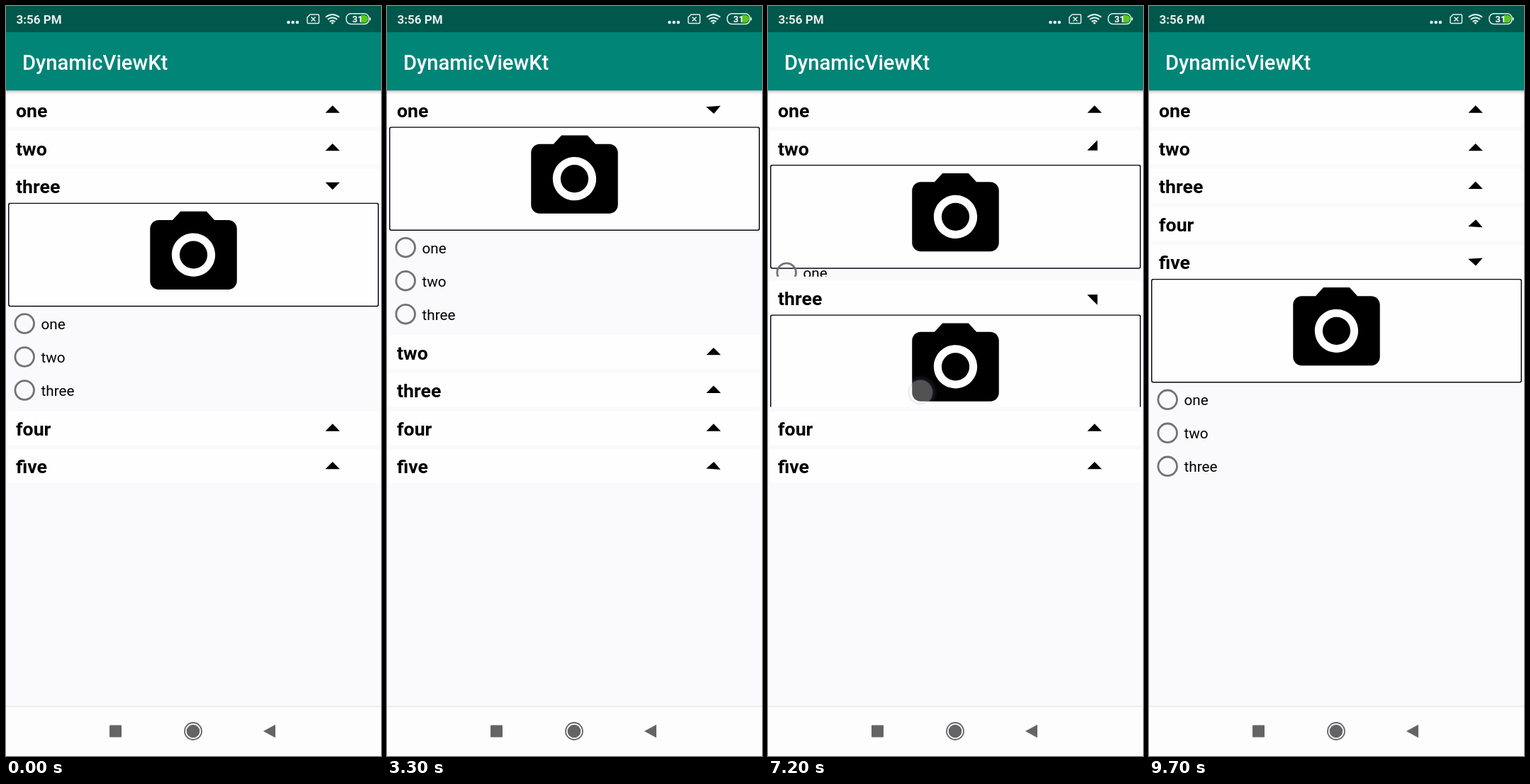
Animation, 529 px wide and 1058 px high, one loop 10 s. Source, as an HTML page:

```html
<!DOCTYPE html>
<html lang="en">
<head>
<meta charset="utf-8">
<title>DynamicViewKt</title>
<style>
html, body { margin: 0; width: 100%; height: 100%; overflow: hidden; background: #faf9fb; }
#stage { display: block; width: 100vw; height: 100vh; font-family: Roboto, sans-serif; }
#stage svg { overflow: hidden; }
.head { font-size: 26.7px; font-weight: 700; }
.item { font-size: 20.7px; }
</style>
</head>
<body>
<svg id="stage" viewBox="0 0 529 1058">
  <defs>
    <linearGradient id="shade" x2="0" y2="1">
      <stop offset="0" stop-color="#000" stop-opacity=".28"/>
      <stop offset=".4" stop-color="#000" stop-opacity=".09"/>
      <stop offset="1" stop-color="#000" stop-opacity="0"/>
    </linearGradient>
    <radialGradient id="glow">
      <stop offset=".6" stop-color="#fff" stop-opacity=".5"/>
      <stop offset="1" stop-color="#fff" stop-opacity="0"/>
    </radialGradient>
    <g id="camera" transform="translate(191 0) scale(6.125)">
      <path fill-rule="evenodd" d="M9 2L7.17 4H4c-1.1 0-2 .9-2 2v12c0 1.1.9 2 2 2h16c1.1 0 2-.9 2-2V6c0-1.1-.9-2-2-2h-3.17L15 2H9zm3 15c-2.76 0-5-2.24-5-5s2.24-5 5-5 5 2.24 5 5-2.24 5-5 5z"/>
      <circle cx="12" cy="12" r="3.2"/>
    </g>
  </defs>
  <rect width="529" height="1058" fill="#faf9fb"/>
  <g id="list"></g>

  <rect y="119" width="529" height="6" fill="url(#shade)"/>
  <rect y="37" width="529" height="82" fill="#008577"/>
  <text x="23" y="89.5" font-size="29.2" font-weight="500" fill="#fff">DynamicViewKt</text>

  <rect width="529" height="37" fill="#00574b"/>
  <g fill="#e6efed">
    <text x="14.5" y="25" font-size="17" font-weight="600">3:56 PM</text>
    <circle cx="398.5" cy="23" r="2.3"/>
    <circle cx="404.7" cy="23" r="2.3"/>
    <circle cx="410.9" cy="23" r="2.3"/>
  </g>
  <g fill="none" stroke="#e6efed" stroke-width="1.5">
    <path d="M429 12h11q1.500 0 1.500 1.500v9.500q0 1.500-1.500 1.500h-13.500q-1.500 0-1.500-1.500v-7zM430.500 15.500l6 6m0-6l-6 6"/>
    <path stroke-width="2" d="M450.800 15.800q9.700-7.600 19.400 0M453.800 19q6.700-5.200 13.400 0M456.700 22.100q3.800-2.900 7.600 0"/>
    <rect x="480" y="10.800" width="32" height="14.700" rx="6.500"/>
  </g>
  <path d="M458.300 23.500q2.200-1.400 4.400 0l-2.200 2.500z" fill="#e6efed"/>
  <path d="M501 12.800h4.500a5.300 5.300 0 0 1 0 10.700h-4.500z" fill="#57c81e"/>
  <rect x="513" y="16" width="1.600" height="4.500" rx=".8" fill="#e6efed"/>
  <text x="496" y="22.700" font-size="13" font-weight="700" fill="#fff" text-anchor="middle">31</text>

  <rect y="987.500" width="529" height="70.500" fill="#fefdfe"/>
  <rect y="987.500" width="529" height="1.300" fill="#e7e6e8"/>
  <g fill="#656366">
    <rect x="146" y="1014.500" width="17" height="17" rx="1"/>
    <circle cx="264" cy="1023" r="9.300"/>
    <circle cx="264" cy="1023" r="12" fill="none" stroke="#656366" stroke-width="1.800"/>
    <path d="M363 1023l17-9.300v18.600z"/>
  </g>
  <g id="finger">
    <circle r="25" fill="url(#glow)" opacity=".7"/>
    <circle r="16.500" fill="#fff" fill-opacity=".7" stroke="#c4c6e6" stroke-width="1.800"/>
  </g>
</svg>
<script>
const LOOP = 10000, STEP = 100;
const TOP = 122.7, PITCH = 53.65, HEAD = 47.5;
const BOX = 147, ITEM = 47, FULL = BOX + 3 * ITEM;
const SLIDE = 213, SPIN = 300;
const NAMES = ['one', 'two', 'three', 'four', 'five'];
const FIRST_OPEN = 2;

// at: touch time, to: row opened, lead: delay before opening, lag: extra delay of closing
const TAPS = [
  { at: 400, x: 250, y: 597, to: 3, lead: 100, lag: 5 },
  { at: 1500, x: 288, y: 656, to: 4, lead: 94, lag: 31 },
  { at: 2900, x: 230, y: 150, to: 0, lead: 94, lag: 35 },
  { at: 4500, x: 193, y: 470, to: 1, lead: 96, lag: 16 },
  { at: 6200, x: 222, y: 508, to: 1, lead: 100, lag: 0 },
  { at: 7000, x: 215, y: 545, to: 2, lead: 100, lag: 0 },
  { at: 8100, x: 206, y: 584, to: 3, lead: 96, lag: 16 },
  { at: 9300, x: 250, y: 652, to: 4, lead: 94, lag: 31 }
];
const FADE = [1, 1, 0.4, 0.12, 0];

const $ = id => document.getElementById(id);
const ease = x => (1 - Math.cos(Math.PI * Math.min(1, Math.max(0, x)))) / 2;

function add(parent, tag, attrs, text) {
  const el = document.createElementNS('http://www.w3.org/2000/svg', tag);
  for (const key in attrs) el.setAttribute(key, attrs[key]);
  if (text) el.textContent = text;
  return parent.appendChild(el);
}

function makeRow(name) {
  const row = add($('list'), 'g');
  add(row, 'rect', { x: 2.5, width: 524, height: HEAD, rx: 2, fill: '#fffeff' });
  add(row, 'text', { x: 14, y: 34.2, class: 'head' }, name);
  const arrow = add(row, 'path', { d: 'M0-5.8L10.2 4.6H-10.2z' });
  const body = add(row, 'svg', { y: HEAD, width: 529, height: FULL });
  add(body, 'rect', {
    x: 3.75, y: 0.75, width: 521.5, height: 145.3, rx: 2.5,
    fill: '#fffeff', stroke: '#080818', 'stroke-width': 1.5
  });
  add(body, 'use', { href: '#camera' });
  const items = NAMES.slice(0, 3).map(label => {
    const item = add(body, 'g');
    add(item, 'circle', { cx: 26.2, r: 13.3, fill: 'none', stroke: '#747275', 'stroke-width': 2.8 });
    add(item, 'text', { x: 49.5, y: 8, class: 'item' }, label);
    return item;
  });
  return { row, arrow, body, items };
}

const rows = NAMES.map(makeRow);

function drawRow(parts, y, height, turn) {
  parts.row.setAttribute('transform', `translate(0 ${y})`);
  parts.arrow.setAttribute('transform', `translate(460.7 23.4) rotate(${180 * turn})`);
  parts.body.setAttribute('height', height);
  parts.body.style.display = height > 0.5 ? '' : 'none';
  // A radio row stays centred in whatever height is left for it
  parts.items.forEach((item, i) => {
    const start = BOX + i * ITEM;
    const room = Math.min(ITEM, height - start);
    item.style.display = room > 0 ? '' : 'none';
    item.setAttribute('transform', `translate(0 ${start + room / 2})`);
  });
}

function draw(t) {
  const n = TAPS.findLastIndex(tap => tap.at <= t);
  const tap = TAPS[n];
  const from = n > 0 ? TAPS[n - 1].to : FIRST_OPEN;
  const to = tap ? tap.to : from;
  const age = tap ? t - tap.at : 0;
  let opened = 1, closed = 1, spun = 1;
  if (from !== to) {
    const start = tap.lead + tap.lag;
    opened = ease((age - tap.lead) / SLIDE);
    closed = ease((age - start) / SLIDE);
    spun = ease((age - start) / SPIN);
  }

  let y = TOP;
  rows.forEach((parts, i) => {
    const height = FULL * (i === to ? opened : i === from ? 1 - closed : 0);
    const turn = i === to ? spun : i === from ? 1 - spun : 0;
    drawRow(parts, y, height, turn);
    y += PITCH + height;
  });

  const shown = tap ? FADE[Math.floor(age / STEP)] || 0 : 0;
  $('finger').setAttribute('opacity', shown);
  if (tap) $('finger').setAttribute('transform', `translate(${tap.x} ${tap.y})`);
}

const begin = performance.now();
function tick() {
  const t = (performance.now() - begin) % LOOP;
  draw(Math.floor(t / STEP) * STEP);
  requestAnimationFrame(tick);
}
tick();
</script>
</body>
</html>
```
